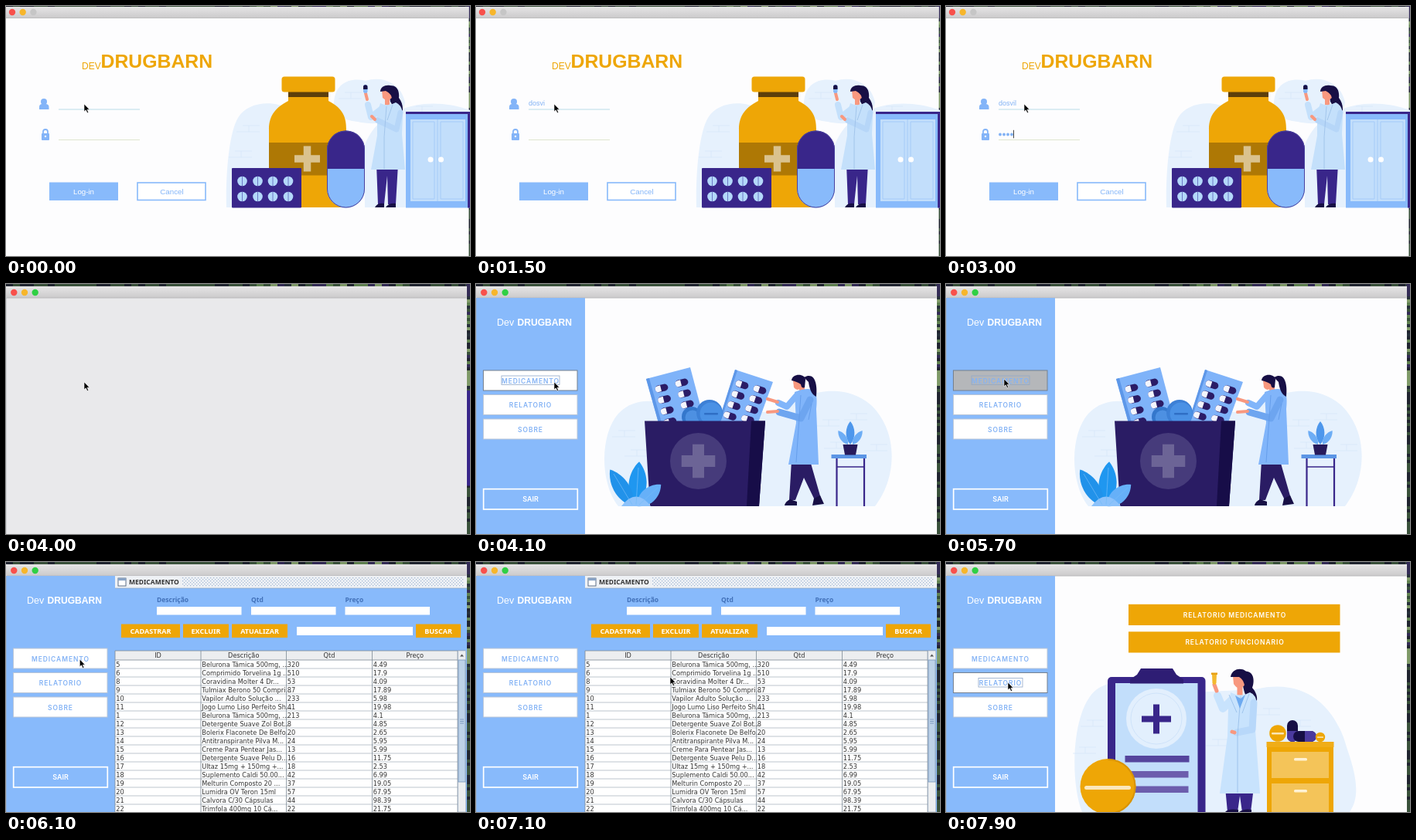
Recreate the animation shown at these times as an HTML page. Size 600x324 px, loop 8 s.

```html
<!DOCTYPE html>
<html lang="pt">
<head>
<meta charset="utf-8">
<title>Stock desk</title>
<style>
html, body { margin: 0; width: 100%; height: 100%; overflow: hidden; background: #fdfdfe; }
svg { display: block; width: 600px; height: 324px; }
text { white-space: pre; }
.sans { font-family: "Liberation Sans", Arial, sans-serif; }
.caps { font-family: Inter, sans-serif; font-weight: 600; font-size: 8.5px; letter-spacing: .9px; }
.label { font-family: "Noto Sans", sans-serif; font-weight: 700; font-size: 8.5px; }
.cell { font-family: "DejaVu Sans", sans-serif; font-size: 8.2px; }
</style>
</head>
<body>
<svg id="stage" viewBox="0 0 600 324" xmlns="http://www.w3.org/2000/svg"></svg>
<script>
const LOOP = 8000;
const SKY = '#88bafb', PALE = '#e6f1fd', ICE = '#c2defb', NAVY = '#170f45',
  VIOLET = '#39268a', GOLD = '#eea606', SKIN = '#f8987f', WHITE = '#fff';

// Drawing helpers
const rect = (x, y, w, h, fill, more = '') =>
  `<rect x="${x}" y="${y}" width="${w}" height="${h}" fill="${fill}" ${more}/>`;
const disc = (x, y, r, fill, more = '') => `<circle cx="${x}" cy="${y}" r="${r}" fill="${fill}" ${more}/>`;
const path = (d, fill, more = '') => `<path d="${d}" fill="${fill}" ${more}/>`;
const line = (d, stroke, width = 1, more = '') =>
  `<path d="${d}" fill="none" stroke="${stroke}" stroke-width="${width}" ${more}/>`;
const limb = (d, stroke, width) => line(d, stroke, width, 'stroke-linecap="round" stroke-linejoin="round"');
const text = (x, y, str, cls, fill, more = '') =>
  `<text x="${x}" y="${y}" class="${cls}" fill="${fill}" ${more}>${str}</text>`;
const mid = 'text-anchor="middle"';
const group = (id, body) => `<g id="${id}">${body}</g>`;
const cross = (x, y, size, bar, fill) =>
  rect(x - size / 2, y - bar / 2, size, bar, fill) + rect(x - bar / 2, y - size / 2, bar, size, fill);
const leaf = (x, y, w, h, turn, fill) =>
  path(`M0 0C${-w} ${-h * .3} ${-w * .8} ${-h * .75} 0 ${-h}C${w * .8} ${-h * .75} ${w} ${-h * .3} 0 0Z`,
    fill, `transform="translate(${x} ${y}) rotate(${turn})"`);
const capsule = (x, y, turn) =>
  `<g transform="translate(${x} ${y}) rotate(${turn})">` +
  rect(-8.5, -4.5, 17, 9, '#2b1c66', 'rx="4.5"') +
  path('M-1 -4H-4.5A4 4 0 0 0 -4.5 4H-1Z', '#f3f5fd') + '</g>';
const bricks = spots => spots.map(([x, y]) =>
  line(`M${x} ${y}h22m-14 0v8m-16 0h30`, '#d5e6f8', .7)).join('');
const lights = (x, y, step, last) =>
  disc(x, y, 4.2, '#f8504b') + disc(x + step, y, 4.2, '#f7b62b') + disc(x + 2 * step, y, 4.2, last);

function desktop() {
  let seed = 7, out = rect(0, 0, 600, 324, '#2a2d3a');
  const rnd = () => (seed = seed * 16807 % 2147483647) / 2147483647;
  const tones = ['#20242f', '#39513a', '#5f8150', '#332b55', '#27303a', '#7f9a68'];
  const tone = n => tones[Math.floor(rnd() * n)];
  for (let x = 0; x < 600; x += 9) out += rect(x, 0, 9, 4, tone(x > 290 && x < 520 ? 6 : 2));
  for (let y = 0; y < 324; y += 4) out += rect(595, y, 5, 4, tone(y < 140 ? 6 : 2));
  return out;
}

function loginArt() {
  let pills = '';
  for (const y of [227, 247]) for (const x of [305.5, 325.5, 345, 365])
    pills += disc(x, y, 6.3, '#b4d8fa') + line(`M${x} ${y - 6}V${y + 6}`, '#6c78c4', 1);
  return path('M285 261C284 220 288 165 300 145C312 124 345 121 368 134V261Z', PALE) +
    path('M424 128C424 100 445 92 465 97C490 89 512 103 516 125C513 150 480 156 455 150C435 148 424 140 424 128Z', PALE) +
    path('M464 261V180C480 135 540 113 600 135V261Z', PALE) +
    bricks([[306, 155], [296, 188], [530, 130], [438, 112]]) +
    // bottle
    path('M365 112H417V123C437 133 440 146 440 160V261H340V160C340 146 345 133 365 123Z', GOLD) +
    rect(365, 111, 52, 7, '#5d3f0a') + rect(356.5, 91.5, 69, 20, GOLD, 'rx="3.5"') +
    rect(340, 177, 100, 42.5, '#ae7805') + cross(389.5, 198, 33, 9.5, '#dac28e') +
    // blister and capsule
    rect(292, 210, 90, 51.5, VIOLET, 'rx="1"') + pills +
    path('M415 211V186A24.5 24.5 0 0 1 464 186V211Z', VIOLET) +
    path('M415 211H464V237A24.5 24.5 0 0 1 415 237Z', SKY) +
    line('M415.5 211V186A24 24 0 0 1 463.5 186V237A24 24 0 0 1 415.5 237Z', '#4a429f', 1) +
    // cabinet
    rect(517, 138, 83, 123.5, SKY) + rect(517, 137, 83, 3, VIOLET) + rect(597, 137, 3, 124.5, VIOLET) +
    rect(523, 147, 71, 106, ICE) + line('M558 147V253M526 150H554V250H526ZM562 150H591V250H562Z', '#a5cbf8', 1) +
    disc(549, 199, 3.5, WHITE) + disc(562.5, 199, 3.5, WHITE) +
    // woman in a coat
    path('M479 205H507L504 257H494L493 220L489 257H481Z', VIOLET) +
    path('M477 261Q480 255 489 256V261ZM491 261Q495 255 504 256V261Z', NAVY) +
    path('M494 104C506 100 509 111 508 119C515 128 514 139 509 148C500 144 504 134 497 124Z', NAVY) +
    limb('M493 116V129', SKIN, 6) +
    path('M484 126Q494 131 504 125Q513 129 513 142L512 166L516 212H472L480 168V140Z', '#c4e0fb') +
    limb('M486 133L472 144L468 128', '#c4e0fb', 8) + limb('M467 121L465 113', SKIN, 4) +
    limb('M510 138L505 160L480 148', '#b6d6f8', 7) + limb('M477 147L473 143', SKIN, 4) +
    line('M492 130L489 170V211M500 128L493 148', '#9bbfe8', .8) +
    path('M486 109Q494 104 499 111V119Q493 125 487 119Z', SKIN) +
    path('M484 111C484 101 500 100 503 108C505 114 502 121 499 121C499 114 494 112 491 110Z', NAVY) +
    rect(462, 102, 5.5, 11, SKY, 'rx="2.7"') + path('M462 108V105A2.7 2.7 0 0 1 467.5 105V108Z', NAVY);
}

function login() {
  return rect(0, 1, 598.5, 323, '#fdfdfe') + rect(0, 1, 598.5, 14.5, 'url(#bar)') +
    line('M0 15.5H598.5', '#b4b4b4', .8) + lights(8, 8, 13.7, '#c6c6c6') +
    text(98, 82, 'DEV', 'sans', GOLD, 'font-size="12"') +
    text(122.5, 80, 'DRUGBARN', 'sans', GOLD, 'font-size="24.8" font-weight="700"') +
    disc(49, 124, 4, '#83b4f8') + path('M43 134V131Q43 127 47 127H51Q55.5 127 55.5 131V134Z', '#83b4f8') +
    rect(46, 165, 10, 9, '#83b4f8', 'rx="1"') + line('M48 166V163A3 3 0 0 1 54 163V166', '#83b4f8', 1.8) +
    disc(51, 169, 1.2, WHITE) +
    line('M68 134H173', '#b9dce8') + line('M68 173.5H173', '#dfe6cf') +
    text(68, 129, '', 'sans', '#82b2f5', 'id="user" font-size="9"') + group('dots', '') +
    rect(0, 0, .9, 10.5, '#333', 'id="caret"') +
    rect(56, 228.5, 89, 23.5, SKY) + text(100.5, 243.5, 'Log-in', 'sans', WHITE, `font-size="9.7" ${mid}`) +
    rect(170, 229, 88, 22.5, WHITE, `stroke="${SKY}" stroke-width="1.6"`) +
    text(214.5, 243.5, 'Cancel', 'sans', '#83b5f8', `font-size="9.8" ${mid}`) + loginArt();
}

function sideButton(name, y, focusX, label) {
  return rect(9.5, y, 121.5, 26, WHITE, `id="${name}" stroke="#b9c6d8" stroke-width="1"`) +
    text(70.5, y + 16.5, label, 'caps', '#84b3f5', mid) +
    rect(focusX, y + 7, (70.5 - focusX) * 2, 11.5, 'none', `id="${name}Focus" stroke="#91a9c8" stroke-width=".8"`);
}

function sidebar() {
  return rect(0, 18, 141, 306, SKY) +
    text(27, 54, 'Dev', 'sans', WHITE, 'font-size="12.5"') +
    text(53.5, 54, 'DRUGBARN', 'sans', WHITE, 'font-size="12.1" font-weight="700"') +
    sideButton('med', 112, 33, 'MEDICAMENTO') + sideButton('rel', 143.5, 42, 'RELATORIO') +
    sideButton('about', 175, 53, 'SOBRE') +
    rect(9.7, 265.7, 121.6, 26.3, 'none', 'stroke="#fff" stroke-width="1.7"') +
    text(70.5, 282, 'SAIR', 'caps', WHITE, `style="font-size:9px;letter-spacing:0" ${mid}`);
}

function home() {
  let pills = '';
  for (let i = 0; i < 4; i++) {
    pills += capsule(240 + i * 3.6, 135 + i * 14.5, -14) + capsule(266 + i * 3.6, 128 + i * 14, -14) +
      capsule(344 - i * 5.2, 130.5 + i * 13.5, 18) + capsule(367 - i * 5.2, 137 + i * 12.8, 18);
  }
  return path('M184 288C160 258 160 195 184 168C210 140 250 154 290 166H400C425 135 480 128 512 158C546 192 545 250 516 288Z', PALE) +
    bricks([[184, 190], [200, 215], [448, 176], [484, 168], [510, 208], [458, 205]]) +
    path('M220 123L277 108L296 180H236Z', '#7fb3f9') + path('M220 123L224 122L240 180H236Z', '#5d97e8') +
    path('M335 111L384 127L364 182H313Z', '#7fb3f9') + path('M335 111L338 112L316 180H313Z', '#5d97e8') + pills +
    disc(279, 172, 13, '#3477cc') + disc(280, 173, 9.5, '#4d90e2') +
    disc(302, 167, 17, '#3d80d6') + disc(304, 168, 14.5, '#4a91e5') +
    rect(295, 167, 18, 2.5, '#2f6fc5', 'rx="1"') +
    path('M218 177.5H374L366 288H225Z', '#2a1c64') + path('M356 177.5H374L366 288H350Z', '#170d48') +
    disc(287.5, 229.5, 36.5, '#463b7b') + cross(287.5, 229.5, 43.5, 15, '#6c6496') +
    // left plant
    leaf(207, 288, 17, 58, 4, '#1f97f0') + leaf(203, 288, 15, 56, -32, '#2192ea') +
    leaf(208, 288, 14, 42, 48, '#66b0f8') + path('M188 288Q207 263 226 288Z', '#8cc2fb') +
    line('M207 286L210 238M202 286L178 246M211 286L235 264', '#75baf7', .7) +
    // worker
    path('M408 229H432L446 278L439 282L424 251L413 280H405Z', '#2a1c64') +
    path('M399 287Q400 282 406 279L415 282V287ZM435 287L437 278L445 274L450 285Z', NAVY) +
    limb('M421 131L422 141', SKIN, 7) +
    path('M412 140Q429 133 437 138Q442 143 440 162L443 234H404L414 180Z', '#81b5fa') +
    limb('M415 144L402 159L391 154', '#81b5fa', 8) + limb('M390 153L377 149', SKIN, 4) +
    limb('M432 150L420 174L392 166', '#6da5f0', 9) + limb('M390 165L377 166', SKIN, 4) +
    line('M420 144L414 231M434 155L430 176', '#5f98e8', .8) +
    path('M410 125Q415 119 422 125V132Q416 141 411 134Z', SKIN) +
    path('M408 125C409 115 426 116 426 124L425 134Q421 136 420 130Q416 127 408 125Z', NAVY) +
    path('M424 121C438 113 442 130 440 146C433 143 431 134 430 127Z', NAVY) +
    // table with a pot
    rect(459.5, 221, 45.5, 5, '#5b95e5') + line('M466.5 226V288M502 226V288', VIOLET, 2.2) +
    line('M467 237H502', VIOLET, 1.5) + path('M474.5 208H493.5L491 221.5H477Z', '#271b5c') +
    leaf(484, 208, 8, 30, 0, '#4e97ec') + leaf(481, 208, 6, 22, -35, '#6dadf5') + leaf(487, 208, 6, 22, 35, '#6dadf5');
}

function report() {
  const bar = (y, label) => rect(236, y, 273.5, 27.2, GOLD) + text(373.5, y + 17, label, 'caps', WHITE, mid);
  return path('M176 324C160 285 162 190 195 165C218 148 260 158 300 170L400 165C470 148 506 195 518 240C532 280 535 305 522 324Z', PALE) +
    bricks([[182, 205], [172, 240], [410, 190], [450, 205], [344, 230]]) +
    bar(54.8, 'RELATORIO MEDICAMENTO') + bar(90.3, 'RELATORIO FUNCIONARIO') +
    // clipboard
    rect(209, 149, 126.5, 180, VIOLET, 'rx="5"') + rect(219, 157, 106.5, 170, ICE) +
    path('M238 157.5V152L247 146L252 138H293L298 146L307 152V157.5Z', '#2e1d74') +
    disc(272, 203, 39, '#e2effd') + disc(272, 203, 33, 'none', 'stroke="#cfe3fa"') + cross(272, 203.5, 38, 8, VIOLET) +
    rect(231.5, 251, 83, 8.5, '#55449d') + rect(231.5, 271, 82, 8.5, '#6c5dad') + rect(231.5, 290.5, 82, 8.5, '#6c5dad') +
    disc(209.5, 291, 36, GOLD) + line('M209.5 256A35 35 0 0 1 209.5 326', '#d89304', 2) +
    rect(179, 290, 60, 5, '#fbe7bb', 'rx="2.5"') +
    // woman in a coat
    path('M361 292H398L394 324H383L380 303L377 324H364Z', VIOLET) + path('M361 324Q365 319 378 321V324ZM379 324Q386 319 395 321V324Z', NAVY) +
    path('M382 142C400 138 399 156 396 163C406 174 403 188 393 187C388 174 385 168 384 160Z', NAVY) +
    limb('M380 157V174', SKIN, 7) +
    path('M368 169Q381 176 393 169Q402 172 402 186L400 218L406 300H354L364 226L365 190Z', '#c8e3fd') +
    limb('M371 177L358 190L351 173', '#c8e3fd', 10) + limb('M350 167L347 159', SKIN, 5) +
    limb('M398 182L396 217L376 221', '#b8d8fa', 9) + limb('M373 221L370 220', SKIN, 5) +
    line('M381 174L377 225V299M392 171L383 196M366 172L376 195', '#94bce8', .8) +
    path('M374 173L381 177L387 172L380 190Z', '#6daaf0') +
    path('M371 148Q379 140 387 149V159Q378 168 372 158Z', SKIN) +
    path('M368 149C370 135 390 136 391 148Q390 160 386 162Q386 153 379 149Z', NAVY) +
    path('M344 145H350L349.5 157Q347 161 344.5 157Z', '#f3b92e') + rect(343, 143.5, 8, 2.5, '#e7a012') +
    // drawers
    rect(414.5, 233, 87, 7, '#f0ad18') + rect(415, 240, 86, 84, GOLD) +
    rect(421, 246, 74, 34, '#f4c459') + rect(421, 287, 74, 37, '#f4c459') +
    rect(450, 254, 17, 3.5, '#fff2d4', 'rx="1.5"') + rect(450, 295, 17, 3.5, '#fff2d4', 'rx="1.5"') +
    disc(429, 222, 10.8, GOLD) + rect(421, 221, 16, 2.5, '#fbe6b5', 'rx="1"') +
    rect(441, 205, 14, 28, NAVY, 'rx="7"') + path('M441 219H455V226A7 7 0 0 1 441 226Z', '#4b3a9e') +
    rect(449, 219, 30, 14, NAVY, 'rx="7"') + path('M464 219H472A7 7 0 0 1 472 233H464Z', '#4b3a9e') +
    disc(484, 227, 6.2, GOLD) + rect(480, 226.3, 8, 1.6, '#fbe6b5');
}

const STOCK = `5|Belurona Támica 500mg, ...|320|4.49
6|Comprimido Torvelina 1g ...|510|17.9
8|Coravidina Molter 4 Dr...|53|4.09
9|Tulmiax Berono 50 Compri...|87|17.89
10|Vapilor Adulto Solução ...|233|5.98
11|Jogo Lumo Liso Perfeito Sh...|41|19.98
1|Belurona Támica 500mg, ...|213|4.1
12|Detergente Suave Zol Bot...|8|4.85
13|Bolerix Flaconete De Belfo...|20|2.65
14|Antitranspirante Pilva M...|24|5.95
15|Creme Para Pentear Jas...|13|5.99
16|Detergente Suave Pelu D...|16|11.75
17|Ultaz 15mg + 150mg +...|18|2.53
18|Suplemento Caldi 50.00...|42|6.99
19|Melturin Composto 20 ...|37|19.05
20|Lumidra OV Teron 15ml|57|67.95
21|Calvora C/30 Cápsulas|44|98.39
22|Trimfola 400mg 10 Cá...|22|21.75`.split('\n').map(row => row.split('|'));

function table() {
  const cols = [141, 252, 362.5, 473.5, 584];
  let out = rect(141, 18, 455, 306, SKY) + rect(141, 18, 455, 16, '#eef1f5') +
    rect(228, 20, 364, 12, 'url(#bumps)') + line('M141 34H596', '#8fa5c0', .8) +
    rect(145, 21, 10, 10, WHITE, 'stroke="#5d6f86"') + rect(145, 21, 10, 3, '#8aa4c6') +
    text(159, 29.3, 'MEDICAMENTO', 'label', '#333');
  [['Descrição', 195], ['Qtd', 317], ['Preço', 438.5]].forEach(([name, x]) => {
    out += text(x, 52, name, 'label', '#4271b9') + rect(x, 58, 109.5, 10.5, WHITE);
  });
  [['CADASTRAR', 149, 76], ['EXCLUIR', 229, 59], ['ATUALIZAR', 292, 72], ['BUSCAR', 530, 58]].forEach(([name, x, w]) => {
    out += rect(x, 80.5, w, 17.5, GOLD) + text(x + w / 2, 92.6, name, 'label', WHITE, `style="font-size:9px" ${mid}`);
  });
  out += rect(376, 84, 150, 11, WHITE) + rect(141, 115, 443, 209, WHITE) + rect(141, 115, 443, 12, '#eceef0');
  ['ID', 'Descrição', 'Qtd', 'Preço'].forEach((name, i) => {
    out += text((cols[i] + cols[i + 1]) / 2, 124, name, 'cell', '#333', mid);
  });
  STOCK.forEach((row, i) => {
    const y = 127 + 11 * i;
    out += line(`M141 ${y + 11}H584`, '#a3adb8', .7);
    row.forEach((value, c) => { out += text(cols[c] + 1.3, y + 8.9, value, 'cell', '#333'); });
  });
  out += line(cols.map(x => `M${x} 115V324`).join('') + 'M141 115H594M141 127H584', '#7d8995', .8);
  return out + rect(584.5, 115, 10, 209, '#eceef0', 'stroke="#a4b1c0" stroke-width=".7"') +
    rect(585, 127, 9, 158, '#bdd2e8', 'stroke="#7694b8" stroke-width=".8"') +
    line('M587 204H592M587 206.5H592M587 209H592', '#6f8fb6', .8) + path('M587 122.5L589.5 119.5L592 122.5Z', '#555');
}

const stage = document.getElementById('stage');
stage.innerHTML = `<defs>
<linearGradient id="bar" x2="0" y2="1"><stop stop-color="#e6e5e6"/><stop offset="1" stop-color="#cbcacb"/></linearGradient>
<pattern id="bumps" width="4" height="4" patternUnits="userSpaceOnUse">${rect(0, 0, 1.2, 1.2, '#9db3cf') + rect(2, 2, 1.2, 1.2, '#9db3cf')}</pattern>
</defs>` + desktop() + group('login', login()) +
  group('app', rect(596, 138, 4, 123.5, VIOLET, 'id="edge"') +
    rect(0, 3, 596, 321, '#e9e9eb', 'id="back"') + rect(0, 3, 596, 15, 'url(#bar)', 'rx="2"') +
    line('M0 18H596', '#b1b1b3', .8) + lights(10.3, 11, 13.7, '#2fd044') +
    group('side', sidebar()) + group('home', home()) + group('table', table()) + group('report', report()) +
    line('M.25 18V324', '#aab0b8', .5)) +
  path('M0 0V9.8L2.3 7.8L4 11.6L5.6 10.9L4 7.2H7Z', '#000', 'id="mouse" stroke="#fff" stroke-width=".6"');

const el = {};
stage.querySelectorAll('[id]').forEach(node => { el[node.id] = node; });
const show = (id, on) => el[id].setAttribute('display', on ? 'inline' : 'none');
const set = (id, attrs) => { for (const k in attrs) el[id].setAttribute(k, attrs[k]); };

const MOUSE = [[0, 101, 127], [4700, 101, 127], [5400, 75, 123], [5900, 75, 123],
  [6850, 251, 149], [7200, 251, 149], [7650, 80, 156], [LOOP, 80, 156]];
const USER = 'dosvil';

function mouseAt(t) {
  const i = MOUSE.findIndex((p, n) => n && t <= p[0]);
  const [t0, x0, y0] = MOUSE[i - 1], [t1, x1, y1] = MOUSE[i];
  const u = (t - t0) / (t1 - t0), k = u * u * (3 - 2 * u);
  return [x0 + (x1 - x0) * k, y0 + (y1 - y0) * k];
}

const typed = (t, start, step, max) => Math.max(0, Math.min(max, Math.floor((t - start) / step) + 1));

function drawLogin(t) {
  const letters = typed(t, 700, 200, USER.length), dots = typed(t, 2200, 200, 4);
  el.user.textContent = USER.slice(0, letters);
  el.dots.innerHTML = Array.from({ length: dots }, (_, i) => disc(70 + i * 5, 166.5, 1.9, '#82b2f5')).join('');
  const second = t >= 2000;
  set('caret', {
    x: second ? 67.5 + dots * 4.9 : 68 + (letters ? el.user.getComputedTextLength() : 0),
    y: second ? 160.8 : 121
  });
  show('caret', t >= 500 && Math.floor(t / 500) % 2 === 0);
}

function drawButton(name, focused, pressed) {
  set(name, { fill: pressed ? '#b5b7ba' : WHITE, stroke: focused ? '#75808e' : '#b9c6d8' });
  show(name + 'Focus', focused);
}

function draw(t) {
  const page = t < 4000 ? 'login' : t < 4100 ? 'blank' : t < 5800 ? 'home' : t < 7800 ? 'table' : 'report';
  const inApp = page !== 'login';
  show('login', !inApp);
  show('app', inApp);
  show('side', inApp && page !== 'blank');
  show('edge', page === 'blank');
  set('back', { fill: page === 'blank' ? '#e9e9eb' : '#fdfdfe' });
  ['home', 'table', 'report'].forEach(id => show(id, id === page));
  if (!inApp) drawLogin(t);
  drawButton('med', page === 'home', t >= 5600 && t < 5800);
  drawButton('rel', t >= 7700, t >= 7700 && t < 7800);
  drawButton('about', false, false);
  const [x, y] = mouseAt(t);
  set('mouse', { transform: `translate(${x} ${y})` });
}

const start = performance.now();
function tick(now) {
  draw(Math.max(0, now - start) % LOOP);
  requestAnimationFrame(tick);
}
draw(0);
requestAnimationFrame(tick);
</script>
</body>
</html>
```
